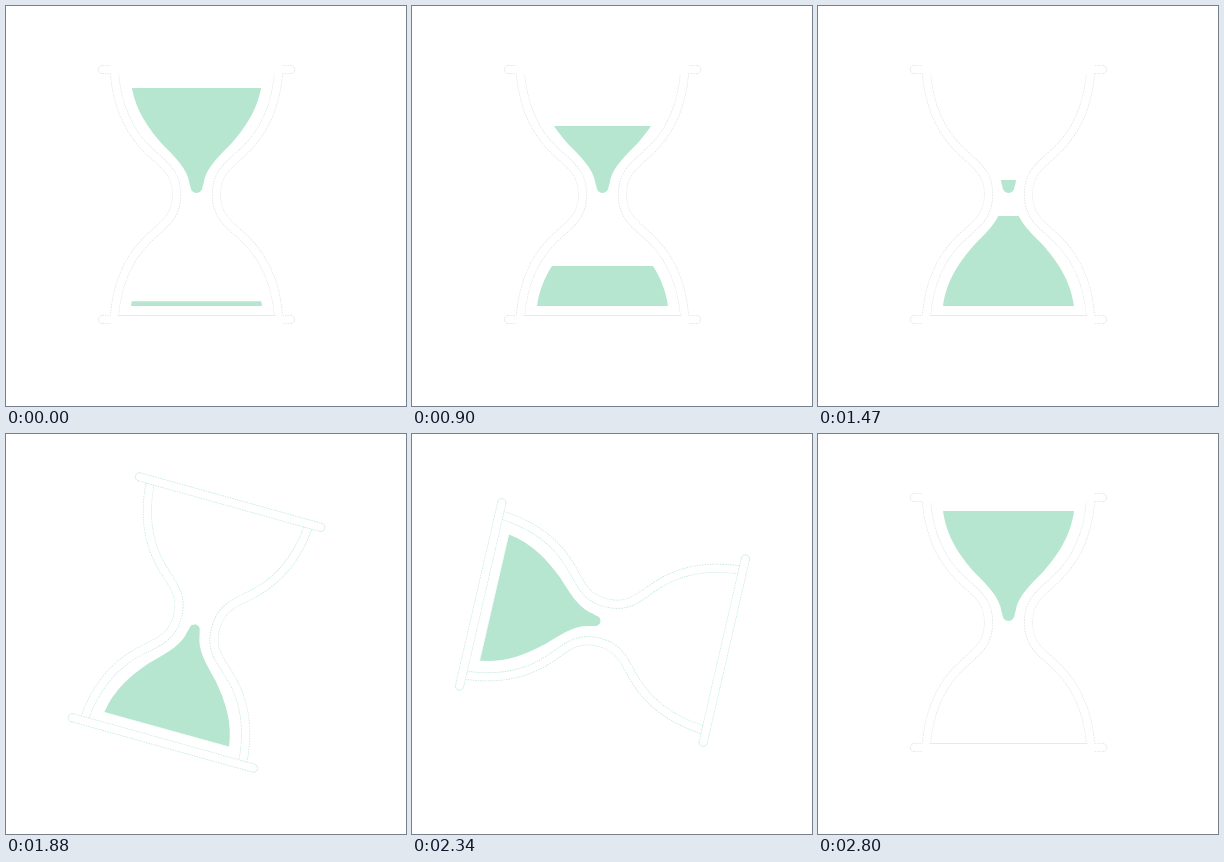
These frames come from a looping animation (400 px wide and 400 px high, 3.1 s). An HTML page with a canvas:

```html
<!DOCTYPE html>
<html>
<head>
<meta charset="utf-8">
<title>Hourglass</title>
<style>
  html, body { margin: 0; width: 100%; height: 100%; overflow: hidden; background: #fff; }
  canvas { display: block; }
</style>
</head>
<body>
<canvas width="400" height="400"></canvas>
<script>
const ctx = document.querySelector('canvas').getContext('2d');
const LOOP = 3100, TURN_START = 1799, TURN_SPEED = 0.19;
const SAND = '#b6e6d0';
const BASE = 111.5; // distance from the neck to the flat side of the sand

// All shapes are relative to the neck of the glass
const bulb = new Path2D(`M-65.5 ${BASE}C-62 85-48 66-34 50C-22 38-9 26-7 11L-6 7.5
  A6 6 0 0 1 6 7.5L7 11C9 26 22 38 34 50C48 66 62 85 65.5 ${BASE}Z`);
const wall = side => `M${side * 82} -121C${side * 79} -86 ${side * 66} -62 ${side * 50} -46
  S${side * 20} -24 ${side * 20} 0S${side * 34} 30 ${side * 50} 46S${side * 79} 86 ${side * 82} 121`;
const walls = new Path2D(wall(-1) + wall(1));
const plates = new Path2D('M-94 -125H94M-94 125H94');

// White band with a thin broken edge
function tube(path, edge, cap) {
  for (const [color, width, dash] of [[edge, 9, [1.5, 1]], ['#fff', 7.6, []]]) {
    ctx.strokeStyle = color;
    ctx.lineWidth = width;
    ctx.lineCap = dash.length ? 'butt' : cap;
    ctx.setLineDash(dash);
    ctx.stroke(path);
  }
}

function drawCaps(edge) {
  ctx.strokeStyle = edge;
  ctx.lineWidth = 0.7;
  ctx.setLineDash([1.5, 1]);
  for (const x of [-94, 94]) {
    for (const y of [-125, 125]) {
      ctx.beginPath();
      ctx.arc(x, y, 4.15, Math.PI / 2, Math.PI * 1.5, x > 0);
      ctx.stroke();
    }
  }
}

function drawGlass(resting) {
  const edge = resting ? '#dfe3e1' : '#bfe8da';
  tube(walls, edge, 'butt');
  tube(plates, edge, 'round');
  drawCaps(edge);
  if (!resting) return;
  ctx.fillStyle = '#fff';
  ctx.fillRect(-86, -131, 172, 11);
  ctx.fillRect(-86, 120, 172, 11);
  ctx.fillStyle = '#e6eae8';
  ctx.fillRect(-79, 120.5, 158, 1);
}

// Sand of one bulb between two heights above its flat side
function drawSand(flip, from, to, trim = 0) {
  if (to <= from) return;
  ctx.save();
  ctx.scale(1, flip);
  ctx.beginPath();
  ctx.rect(-70, BASE - to, 140, to - from);
  ctx.clip();
  ctx.fillStyle = SAND;
  ctx.fill(bulb);
  if (trim) {
    ctx.strokeStyle = '#fff';
    ctx.lineWidth = trim * 2;
    ctx.setLineDash([]);
    ctx.stroke(bulb);
  }
  ctx.restore();
}

function draw(ms) {
  const s = ms / 1000;
  const angle = Math.min(180, Math.max(0, (ms - TURN_START) * TURN_SPEED));
  const resting = angle % 180 === 0;
  const drained = 5 + 30 * s + 15 * s ** 3;

  ctx.setTransform(1, 0, 0, 1, 0, 0);
  ctx.fillStyle = '#fff';
  ctx.fillRect(0, 0, 400, 400);
  ctx.translate(190.5, 188.5);

  ctx.save();
  if (!resting) ctx.rotate(angle * Math.PI / 180);
  drawGlass(resting);
  ctx.restore();

  if (angle > 0) {
    ctx.rotate(angle * Math.PI / 180);
    drawSand(1, 0, BASE, resting ? 0 : 0.7);
  } else {
    drawSand(-1, drained, BASE);
    drawSand(1, 0, Math.min(BASE, drained * 0.93));
  }
}

const start = performance.now();
function tick() {
  draw((performance.now() - start) % LOOP);
  requestAnimationFrame(tick);
}
tick();
</script>
</body>
</html>
```
